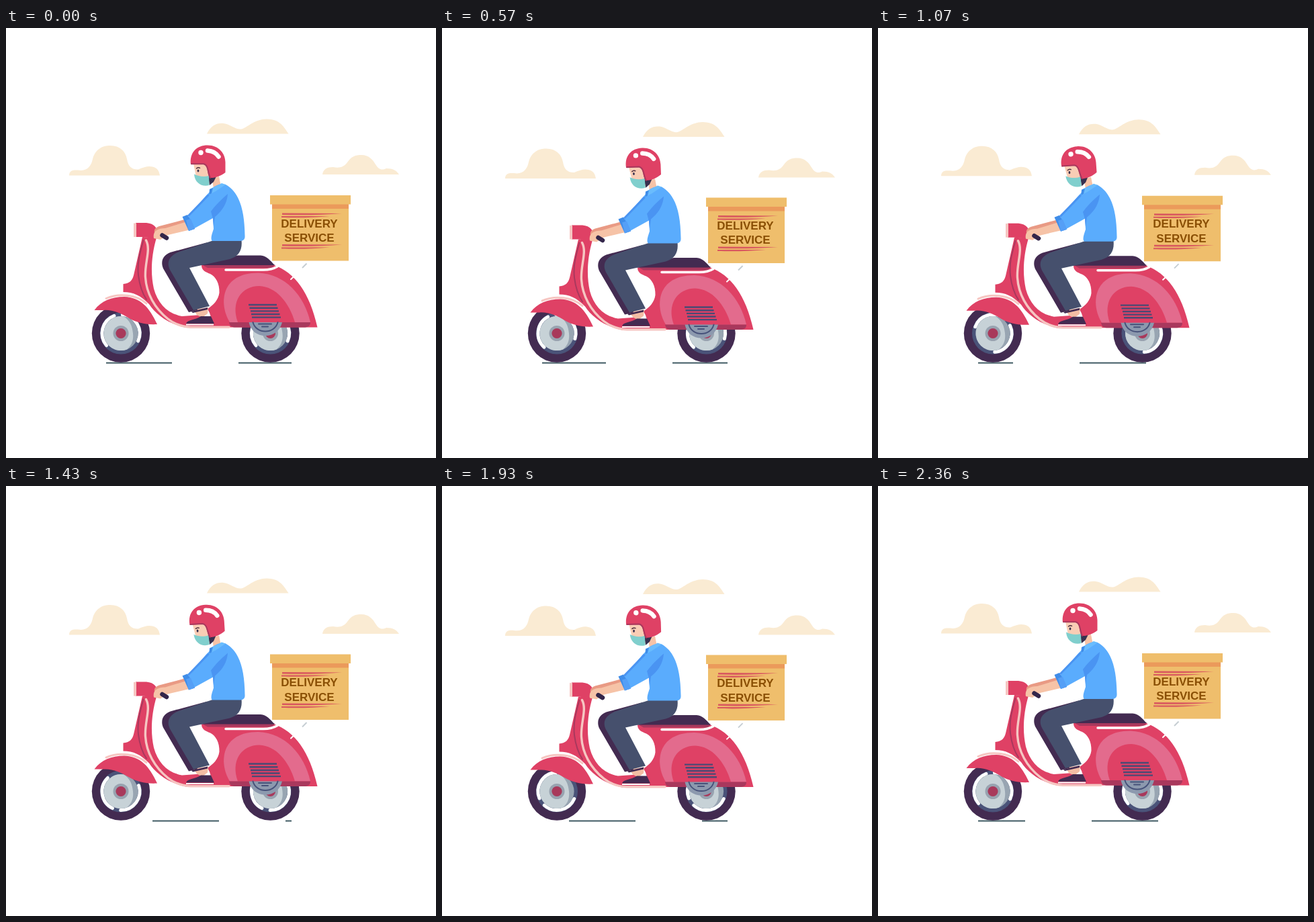
These frames come from a looping animation (640x640 px, 2430 ms). An HTML page:

```html
<!DOCTYPE html>
<html lang="en">
<head>
<meta charset="utf-8">
<title>Delivery scooter</title>
<style>
html, body { margin: 0; width: 100%; height: 100%; overflow: hidden; background: #fff; }
svg { display: block; width: 100vw; height: 100vh; }
text { font: bold 17px "Liberation Sans", Arial, sans-serif; fill: #8a4f04; text-anchor: middle; }
.line { fill: none; stroke-linecap: round; stroke-linejoin: round; }
.red { fill: #df4165; }
.wine { fill: #a9385d; }
.plum { fill: #432b51; }
</style>
</head>
<body>
<svg viewBox="0 0 640 640">
  <defs>
    <g id="tire">
      <circle r="43.2" class="plum"/>
      <circle r="31" fill="#4a5379"/>
    </g>
    <g id="hub">
      <circle r="25.6" fill="#98a5b2"/>
      <path d="M4 -25.3A25.6 25.6 0 1 0 9 24C17 17 19 9 18 0C17 -11 13 -20 4 -25.3Z" fill="#c7d2d7"/>
      <circle r="11.5" fill="#98a3b0"/>
      <circle r="7.6" fill="#a8395b"/>
    </g>
    <path id="rim" class="line" stroke="#fff" stroke-width="5"/>
  </defs>

  <g id="clouds" fill="#faebd3">
    <path d="M94 219.500C94 212 100 211 107 211.500C121 214 127 205 129 195C133 180 144 175 155 175C170 175 178 184 180 195C182 207 188 211 197 210.500C206 206.500 212 205 218 206.500C226 208 228 214 229 219.500Z"/>
    <path d="M299 157.500C305 145 314 141 324 142C336 144 343 153 352 150C362 146 370 136 388 135.500C406 136 412 144 420.500 157.500Z"/>
    <path d="M471 218C472 210 478 207 487 207C496 209 503 207 508 200C514 191 520 189 529 189C540 189 546 196 550 203C555 211 559 212 566 209C576 209 581 212 585 218Z"/>
  </g>

  <path id="road" d="M149 498.500H425" stroke="#3f5a63" stroke-width="2.200"/>

  <g transform="translate(171 454.500)"><use href="#tire"/><use href="#rim"/><use href="#hub"/></g>
  <g transform="translate(393.500 454.500)"><use href="#tire"/><use href="#rim"/><use href="#hub"/></g>

  <g id="ride">
    <!-- body -->
    <path class="red" d="M291 353H399C430 364 452 394 463.500 445.500H333L309 443L303 424L300 418C309 412 316 405 317.500 394C318 380 312 370 304 366C297 363 291 361 291 353Z"/>
    <path d="M333 438C316 410 320 364 376 364.500C415 366 444 398 453 438Z" fill="#e36b8d"/>
    <path class="red" d="M345 438C334 408 350 384 377 384C402 385 421 408 430 438Z"/>
    <path class="wine" d="M332 438H453C453 443 450 445 445 445.500H340C335 445 333 443 332 438Z"/>
    <path d="M361 412H403M362.500 416.700H404.500M364 421.400H406M365 426H407.500M366 430.600H409" stroke="#4b4a74" stroke-width="2.400"/>
    <path class="wine" d="M291 352H400L396 357H300Z"/>
    <path d="M290 353C292 350 298 349 304 347L345 338.500H379C388 339 393 346 400 353Z" class="plum"/>
    <path class="line" d="M327 360H383C394 360 399 358 404 355" stroke="#fff" stroke-width="3.500"/>
    <path class="line" d="M424 374L434 364.500" stroke="#fff" stroke-width="2"/>
    <path d="M441 357L447.500 350.500" stroke="#c6ced3" stroke-width="2"/>

    <!-- engine -->
    <path d="M361.500 438H411C408 451 398 458 386 458C374 458 364 451 361.500 438Z" fill="#8c99ae"/>
    <path class="line" d="M367.500 438C372 456 400 456 404.500 438M376 440.500H395M381 444.500H390" stroke="#47527a" stroke-width="2"/>

    <!-- leg shield -->
    <path class="red" d="M203 311L224 312C216 340 215 365 220 388C226 410 240 425 262 429L290 427L310 440L332 446H268C240 440 222 425 213 411C200 398 190 393 174.500 393V381C184 380 188 376 190 368Z"/>
    <path class="line" d="M204.500 316C199 336 195 350 197 368C199 384 203 395 209 404" stroke="#a9385d" stroke-width="2"/>
    <path class="line" d="M208.500 316C216 330 206 350 207.500 371C209 395 221 417 241 433C251 441 262 444.500 275 445.200H332" stroke="#f6c6c2" stroke-width="3.400"/>
    <path class="red" d="M193 290H209C221 291 226 298 225 306L222 313L203 311H193Z"/>
    <path d="M190 290.500H194V311H190Z" fill="#f6c6c2"/>

    <!-- front fender -->
    <path class="red" d="M131.500 420C142 406 157 400 176 400C200 401 213 415 225 441C207 442 195 438 185 433C170 424 158 419 145 420Z"/>
    <path class="line" d="M149 402.500C168 394 195 397 209 410" stroke="#f6c6c2" stroke-width="3"/>

    <!-- shoes -->
    <path d="M279 419L301 416L300 425L292 431L284 427Z" fill="#f3bda4"/>
    <path class="plum" d="M268 440C270 434 281 435 290 429L305 429L310 440Z"/>
    <path d="M268 441.500H309" stroke="#fff" stroke-width="2"/>

    <!-- legs -->
    <path class="plum" d="M300 319L248 333C235 336 229 346 234 358L272 423L285 420L262 340Z"/>
    <path d="M309 316L350.500 316C352 330 347 340 333 344L273 357L303 414L279 420L244 360C238 348 244 338 258 333Z" fill="#46506d"/>
    <path class="plum" d="M276 422L300 416L300 419L278 424Z"/>

    <!-- arms -->
    <path d="M266 285L228 295C222 297 220 301 221 304L270 293Z" fill="#e99a84"/>
    <path d="M270 288L237 298C225 298 218 303 220 313L230 315L241 308L275 300Z" fill="#f6c3a7"/>
    <path class="line" d="M232.500 308.500L239 312.500" stroke="#33264a" stroke-width="6.500"/>

    <!-- neck and shirt -->
    <path d="M307 224L317 221L320 236L309 240Z" fill="#f6c3a7"/>
    <path d="M303 244C308 235 317 231 327 233C348 245 355 272 355.500 309C356 315 353 316.500 349 317H307C304 314 306 308 309 299L308 283L279 299L270 283C280 272 291 256 303 244Z" fill="#5aacfd"/>
    <path d="M330 247C322 254 313 262 305 273L308 284L309 295L311 281C321 273 329 262 330 247Z" fill="#4a94f2"/>
    <path class="line" d="M301 249L272 279" stroke="#4a94f2" stroke-width="3"/>
    <path d="M262.500 281L270 278L276 288L281 299L272 302Z" fill="#3f8de9"/>
    <path d="M268 286L275 284L281 299L272 302Z" fill="#559ff6"/>
    <path d="M302.500 248L303 240L321 231L327 233L312 243Z" fill="#6abcfd"/>
    <path d="M302.500 248L303 240L308 238L306 246Z" fill="#3f8de9"/>

    <g id="head">
      <path d="M279 202H304L310 226L300 234L284 226Z" fill="#f9cdb5"/>
      <path d="M301 220L313 221L309 229L303 234Z" fill="#37304f"/>
      <path d="M280 217.500C287 221 294 222 302 220L302.500 234C292 237 281 231 280 217.500Z" fill="#80cfcd"/>
      <path class="line" d="M283.500 209Q286 207 288.500 208.300" stroke="#4b2c3d" stroke-width="1.500"/>
      <ellipse cx="286" cy="212.500" rx="1.400" ry="2.100" fill="#37304f"/>
      <path class="red" d="M275 203C273 185 284 174.500 300 174.500C317 174.500 326.500 187 326.500 200V215C320 220 312 223.500 303 223C299 216 301 208 296 203Z"/>
      <path class="line" d="M276 202.300H294C302 204 300 216 304 223" stroke="#a9385d" stroke-width="2"/>
      <circle cx="290" cy="185.500" r="3.700" fill="#fff"/>
      <path class="line" d="M300 182.500C308 183 313 186 316.500 191.500" stroke="#fff" stroke-width="6.500"/>
    </g>

    <!-- parcel -->
    <path d="M396 262H510V346.500H396ZM393 249H513V262.500H393Z" fill="#efbe6c"/>
    <path d="M396 262.500H510V269H396Z" fill="#eb9a5b"/>
    <g fill="#d9585f">
      <path id="streak" d="M411 275.500L500 276C470 278.500 440 278.500 411 278ZM410 280H482C455 282.700 430 282.500 410 282Z"/>
      <use href="#streak" y="46.500"/>
    </g>
    <text x="451.500" y="296.500">DELIVERY</text>
    <text x="451.500" y="318">SERVICE</text>
  </g>
</svg>
<script>
const LOOP = 2430, STEPS = 34, LAST = STEPS - 1;
const DASH = 99;
// Road travel in px at a few steps
const TRAVEL = [[0, 0], [4, 104], [8, 195], [15, 350], [20, 466], [27, 635], [33, 764]];
const TURN = 4 * 360 / 764; // wheel degrees per px of road

const $ = id => document.getElementById(id);
const [clouds, road, rim, ride, head] = ['clouds', 'road', 'rim', 'ride', 'head'].map($);

const triangle = x => 1 - Math.abs(1 - 2 * (x % 1));

function lerpAt(points, x) {
  const i = Math.max(1, points.findIndex(p => p[0] >= x));
  const [x0, y0] = points[i - 1], [x1, y1] = points[i];
  return y0 + (y1 - y0) * (x - x0) / (x1 - x0);
}

function arc(r, from, to) {
  const at = deg => {
    const a = deg * Math.PI / 180;
    return `${r * Math.cos(a)} ${r * Math.sin(a)}`;
  };
  return `M${at(from)}A${r} ${r} 0 0 1 ${at(to)}`;
}

// Wide gap at 0 degrees, narrow gap opposite
rim.setAttribute('d', arc(28, 58, 167) + arc(28, 193, 302));
road.setAttribute('stroke-dasharray', DASH);

function draw(ms) {
  const step = Math.min(LAST, Math.floor((ms % LOOP) / LOOP * STEPS + 0.08));
  const p = step / LAST;
  const bob = triangle(p * 2);
  const travel = lerpAt(TRAVEL, step);
  clouds.setAttribute('transform', `translate(0 ${4.7 * bob})`);
  ride.setAttribute('transform', `translate(0 ${3.6 * bob})`);
  head.setAttribute('transform', `rotate(${-4.5 * triangle(p)} 312 228)`);
  rim.setAttribute('transform', `rotate(${82 - TURN * travel})`);
  road.setAttribute('stroke-dashoffset', 1 - travel);
}

const start = performance.now();
function tick() {
  draw(performance.now() - start);
  requestAnimationFrame(tick);
}
tick();
</script>
</body>
</html>
```
